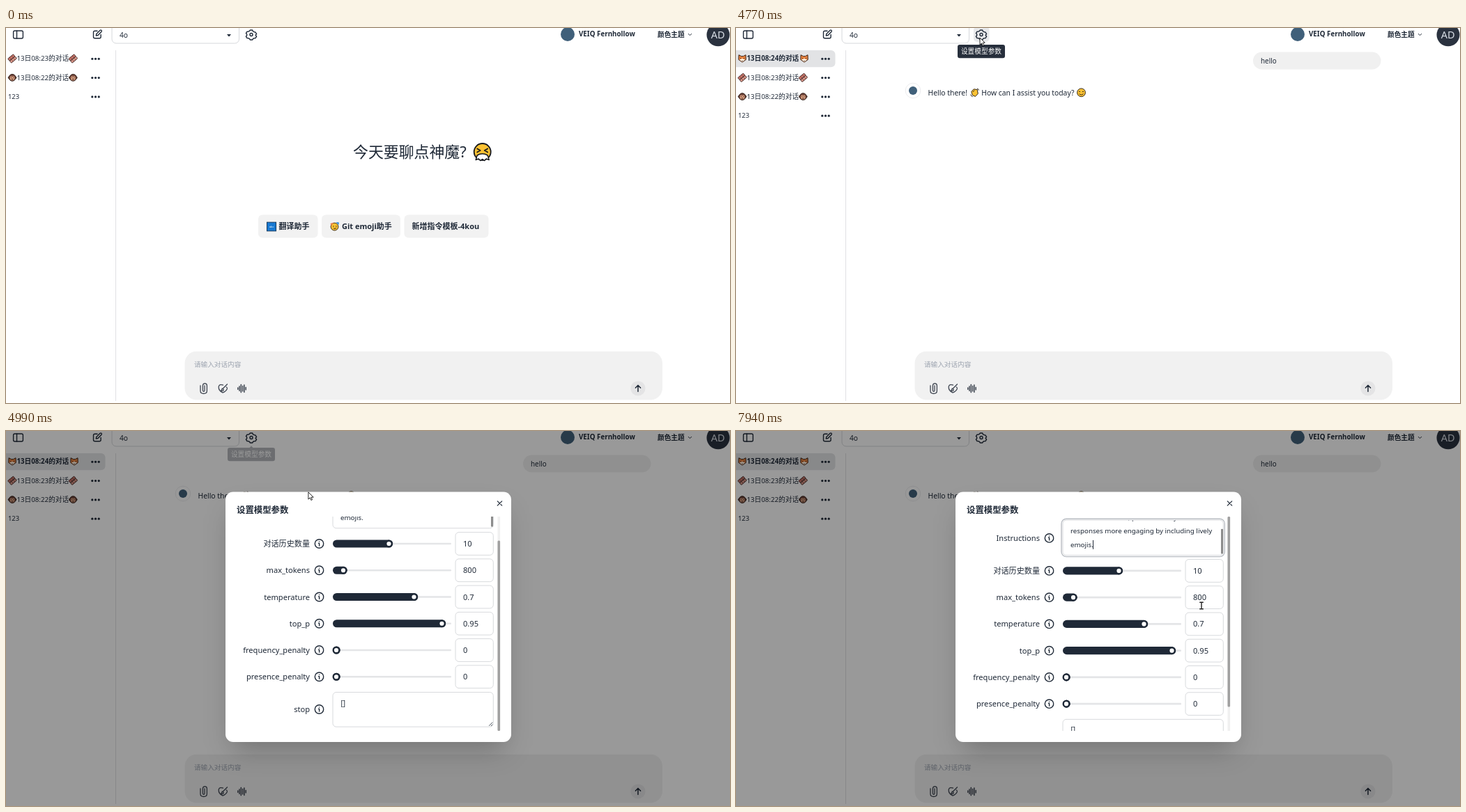
These frames come from a looping animation (1039 by 539 pixels, 7990 ms). An HTML page:

```html
<!DOCTYPE html>
<html lang="zh-CN">
<head>
<meta charset="utf-8">
<title>Chat</title>
<style>
  html, body { margin: 0; width: 100%; height: 100%; overflow: hidden; background: #fff; }
  svg { display: block; width: 1039px; height: 539px; }
  text { font-family: "Noto Sans", "Noto Sans CJK SC", "Noto Sans CJK", sans-serif; fill: #1f2937; white-space: pre; }
  .b { font-weight: 700; }
  .end { text-anchor: end; }
  .mid { text-anchor: middle; }
  .line { fill: none; stroke: #1f2937; stroke-width: 1.4; stroke-linecap: round; stroke-linejoin: round; }
  .field { fill: #fff; stroke: #d8dadd; stroke-width: 1; }
  .soft { fill: #f2f2f2; }
  .dark { fill: #1f2937; }
  .shadow { fill: rgba(0, 0, 0, .25); filter: blur(19px); }
</style>
</head>
<body>
<svg viewBox="0 0 1039 539">
  <defs>
    <clipPath id="bodyClip"><rect x="325" y="123" width="390" height="308"/></clipPath>
    <clipPath id="areaClip"><rect x="469" y="89.5" width="230" height="50"/></clipPath>
    <g id="fox">
      <path d="M-5-5.3L-1.5-3.5H1.5L5-5.3 5.2 1.5 0 5.2-5.2 1.5Z" fill="#e98440" stroke="#3b2418"/>
      <path d="M-4 1.5L0 0 4 1.5 0 4.7Z" fill="#fff3e4"/>
      <path d="M-2.3-1v1M2.3-1v1M-.6 3.2H.6" stroke="#2a1a14" fill="none"/>
    </g>
    <g id="meat" transform="rotate(-40) scale(.86)">
      <rect x="-6" y="-4.6" width="12" height="4.4" rx="1.3" fill="#c9776c" stroke="#38201c"/>
      <rect x="-6" y=".2" width="12" height="4.4" rx="1.3" fill="#dd9c8e" stroke="#38201c"/>
      <path d="M-2-4v3M2-4v3M-2 1v3M2 1v3" stroke="#743d35"/>
    </g>
    <g id="monkey">
      <circle cx="-4.4" r="1.4" fill="#c48a68" stroke="#33211b"/>
      <circle cx="4.4" r="1.4" fill="#c48a68" stroke="#33211b"/>
      <circle r="4.9" fill="#70453a" stroke="#33211b"/>
      <path d="M-3.3-.5Q-2-3 0-1.3 2-3 3.3-.5 4 4 0 4-4 4-3.3-.5Z" fill="#d39a7c"/>
      <path d="M-1.5-.6v1M1.5-.6v1M-1.3 2.4H1.3" stroke="#33211b" stroke-width=".9"/>
    </g>
    <g id="sneeze">
      <circle r="12" fill="#fcc233" stroke="#16181d" stroke-width="1.8"/>
      <path d="M-7.5-4.5L-3-2-7.5.5M7.5-4.5L3-2 7.5.5" fill="none" stroke="#16181d" stroke-width="1.7" stroke-linecap="round" stroke-linejoin="round"/>
      <path d="M-9.5 11.5L-7.5 5Q0 .5 7.5 5L9.5 11.5 5.5 10 3 12.6 0 10.6-3 12.6-5.5 10Z" fill="#fff" stroke="#16181d" stroke-width="1.5" stroke-linejoin="round"/>
    </g>
    <g id="abc">
      <rect x="-6.5" y="-6.3" width="13" height="12.6" fill="#1879d2" stroke="#163a5e"/>
      <text class="mid" y="1.4" font-size="4" style="fill:#fff">abc</text>
    </g>
    <g id="party">
      <circle r="5.4" cy=".6" fill="#fcc233" stroke="#3a2c16"/>
      <path d="M-6-4L-1-5.6-4.6-.6Z" fill="#e8804a"/>
      <path d="M1.8-5.8H6.2V-2Z" fill="#2d8bd8"/>
      <path d="M-2.5 0h1.6M1.5 0h1.6M-1.5 2.8Q.5 4.5 2.5 2.4" fill="none" stroke="#3a2c16"/>
    </g>
    <g id="wave">
      <path d="M-4.5-1.5L-1-5.2 4-4.4 5 1.5 1 5.4-3 3.5Z" fill="#fcc233" stroke="#30261a" stroke-linejoin="round"/>
      <path d="M-2.5-1L0-3.5M-5.6 2.5q.5 2.6 3 3.2M3.6-6q2.2.4 2.6 2.6" fill="none" stroke="#30261a"/>
    </g>
    <g id="smile">
      <circle r="5.9" fill="#fcc233" stroke="#30261a"/>
      <path d="M-3.6-1q1-1.5 2.2 0M1.4-1q1.2-1.5 2.2 0M-3 1.7q3 3.2 6 0" fill="none" stroke="#30261a"/>
    </g>
  </defs>

  <rect width="1039" height="539" fill="#fff"/>

  <!-- header -->
  <g class="line">
    <rect x="10.6" y="4" width="13.8" height="11" rx="2"/><path d="M15.5 4v11"/>
    <path d="M131 4.3h-3.5q-2 0-2 2v6.4q0 2 2 2h6.6q2 0 2-2V9.5M129.3 11l.5-2.6 5.2-5.2q1-.7 1.9.1t.1 1.9l-5.1 5.3z"/>
    <rect x="152" y="-10" width="182.5" height="32" rx="6" style="stroke:#d6d8db;stroke-width:1"/>
  </g>
  <text x="163" y="13.5" font-size="10.2">4o</text>
  <path class="dark" d="M317 9h6l-3 3.4z"/>
  <rect id="hover" x="341" y="-2" width="22.5" height="22" rx="5" fill="#e8e9eb"/>
  <g class="line">
    <path d="M350.3 3h3.4l.7 1.8 2 .9 1.6.3 1.6 2.6-1.2 1.2v1.1l1.2 1.2-1.6 2.4-1.9.1-1.7 1-.7 1.4h-3.4l-.7-1.4-1.7-1-1.9-.1-1.6-2.4 1.2-1.2V8.8l-1.2-1.2 1.6-2.4 1.9-.1 1.7-.9z"/>
    <circle cx="352" cy="9.5" r="2"/>
    <path d="M979.3 8.4l2.2 2.2 2.2-2.2" style="stroke-width:1"/>
  </g>
  <circle cx="806" cy="9" r="10" fill="#40607a"/>
  <text class="b" x="822" y="12" font-size="9.8">VEIQ Fernhollow</text>
  <text class="b" x="935" y="13" font-size="9.7">颜色主题</text>
  <circle cx="1022" cy="9.8" r="16.5" fill="#2a323f"/>
  <text class="mid" x="1021.8" y="15" font-size="14.5" style="fill:#d9dee6">AD</text>

  <!-- sidebar -->
  <path d="M157.5 32V536" stroke="#e0e1e3"/>
  <g id="active">
    <rect x="-6" y="32" width="148.5" height="24.2" rx="6" fill="#e2e3e5"/>
    <g id="activeRow"></g>
  </g>
  <g id="rows"></g>

  <!-- start page -->
  <g id="home">
    <text x="498" y="186" font-size="21.9">今天要聊点神魔?</text>
    <use href="#sneeze" x="683.7" y="178"/>
    <rect class="soft" x="362" y="268.5" width="85.5" height="33" rx="6"/>
    <rect class="soft" x="453" y="268.5" width="113" height="33" rx="6"/>
    <rect class="soft" x="571.5" y="268.5" width="121" height="33" rx="6"/>
    <use href="#abc" x="381" y="285.5"/>
    <use href="#party" x="471.5" y="285"/>
    <g class="b" font-size="11">
      <text x="391.5" y="289.2">翻译助手</text>
      <text x="482" y="289.2">Git emoji助手</text>
      <text x="582.5" y="289.2">新增指令模板-4kou</text>
    </g>
  </g>

  <!-- conversation -->
  <g id="sent">
    <rect x="742" y="34.5" width="183.5" height="25" rx="12.5" fill="#f0f0f0"/>
    <text x="753" y="50.6" font-size="9.9">hello</text>
  </g>
  <g id="reply" font-size="10.35">
    <circle cx="254" cy="90" r="10.8" fill="#fff" stroke="#ececee"/>
    <circle cx="254" cy="90" r="6" fill="#40607a"/>
    <text id="wait" x="275.5" y="96.6" font-size="10.5"></text>
    <text id="say1" x="275.5" y="96.6"></text>
    <use id="emo1" href="#wave" x="342.3" y="93"/>
    <text id="say2" x="352.3" y="96.6"></text>
    <use id="emo2" href="#smile" x="495.5" y="92.8"/>
  </g>

  <!-- composer -->
  <rect x="256.5" y="464.8" width="685.5" height="69.7" rx="17" fill="#f1f1f1"/>
  <text id="hint" x="270" y="486.6" font-size="9.65" style="fill:#9ca3af">请输入对话内容</text>
  <text id="typed" x="270" y="486.6" font-size="9.9"></text>
  <path id="caret" d="M0 476v14" stroke="#1f2937"/>
  <g class="line" style="stroke:#3f4651;stroke-width:1.3">
    <path d="M279 514v7.5q0 4 4.7 4t4.7-4V514q0-3.2-3-3.2t-3 3.2v6.8q0 1.6 1.3 1.6t1.3-1.6V514"/>
    <path d="M317.5 512l-6.5 6.5M310.2 518.3q2 .2 2 2-1 1.7-3.6 1.2.9-1 1.6-3.2M311.5 513.2q-5.6-2-6.3 2.5-.3 5.5 5.8 8.5 4.8-1.8 6.3-5.4.6-2-1.1-2.8"/>
    <path d="M332.8 517v2.5M335 515v6.5M337.3 512.6v11.2M339.6 514.5v7.5M341.9 513v10.5M344.2 516.5v3.5" style="stroke-width:1.5"/>
  </g>
  <circle cx="907" cy="518" r="10.6" fill="#e4e4e5"/>
  <path id="up" class="line" d="M907 522.4v-8.6M903.4 517.3l3.6-3.7 3.6 3.7" style="stroke-width:1.5"/>
  <rect id="halt" class="dark" x="902.2" y="513.3" width="9.8" height="9.8" rx="1"/>

  <g id="tip">
    <path d="M318 27q0-3 3-3h28.5l2.5-2.5 2.5 2.5H383q3 0 3 3v13.3q0 3-3 3H321q-3 0-3-3z" fill="#272f3c"/>
    <text class="mid" x="352" y="37.4" font-size="9.7" style="fill:#fff">设置模型参数</text>
  </g>

  <rect id="shade" width="1039" height="539"/>

  <!-- settings dialog -->
  <g id="modal">
    <rect class="shadow" x="324.5" y="116.5" width="391" height="340.5" rx="11"/>
    <rect x="315" y="87.5" width="410" height="359.5" rx="11" fill="#fff"/>
    <text class="b" x="331" y="118.2" font-size="12.4">设置模型参数</text>
    <path class="line" d="M705.3 100.8l6.4 6.4M711.7 100.8l-6.4 6.4" style="stroke-width:1.2"/>
    <rect x="705.5" y="123" width="3.6" height="308" fill="#f0f0f0"/>
    <rect id="bar" x="705.5" y="157.5" width="3.6" height="273.5" rx="1.5" fill="#a0a0a0"/>
    <g clip-path="url(#bodyClip)">
      <g id="scroll">
        <rect id="ring" x="467" y="87.3" width="234.3" height="54.4" rx="7" fill="none" stroke="#b9bdc3" stroke-width="1.4"/>
        <rect class="field" x="469" y="89.2" width="230.3" height="50.5" rx="5"/>
        <g clip-path="url(#areaClip)" font-size="9.75">
          <text x="480" y="89.4">With conversation, please make your</text>
          <text x="480" y="108.6">responses more engaging by including lively</text>
          <text x="480" y="127.7">emojis.</text>
          <rect x="696" y="102" width="3.2" height="35.5" fill="#8d8d8d"/>
        </g>
        <path id="caret2" d="M512.5 118v13" stroke="#1f2937"/>
        <g id="params"></g>
        <rect class="field" x="469" y="375.5" width="230.3" height="49.7" rx="5"/>
        <text x="480.5" y="394.6" font-size="10">[]</text>
        <path class="line" d="M693.5 423.5l4.5-4.5M696.2 423.8l1.8-1.8" style="stroke-width:.8"/>
      </g>
    </g>
  </g>

  <g id="mouse">
    <path id="arrow" d="M0 0V10.2L2.4 8 4 11.6 5.7 10.8 4.1 7.3H7.3Z" fill="#fff" stroke="#111" stroke-width=".9"/>
    <path id="beam" d="M-2.8-4.8H2.8M0-4.8V4.8M-2.8 4.8H2.8" fill="none" stroke="#222" stroke-width="1.4"/>
    <path id="hand" d="M-1.8 1.6V-5q0-1.2 1-1.2t1 1.2v3.2q1.2-.5 1.6.5 1.2-.5 1.6.5 1.2-.1 1.2 1.1v2.5q0 3.4-3 3.4H.2q-1.5 0-2.4-1.6L-4.3 1.5q-.4-1.5 1-1.2z" fill="#fff" stroke="#111" stroke-width=".9" stroke-linejoin="round"/>
  </g>
</svg>

<script>
const LOOP = 7990, TICK = 68.9, BLINK = 530;
const SEND = 1730, REPLY = 1830, STREAM = 2860, DONE = 3540, OPEN = 4835, FOCUS = 6220;
const el = {};
document.querySelectorAll('[id]').forEach(n => el[n.id] = n);

const show = (id, on) => el[id].setAttribute('visibility', on ? 'visible' : 'hidden');
const set = (id, name, value) => el[id].setAttribute(name, value);

// value of the last key reached
const step = (keys, t) => keys.reduce((v, k) => t >= k[0] ? k[1] : v, 0);

// linear interpolation of column c between timed keys
function mix(keys, t, c = 1) {
  const i = keys.findIndex(k => k[0] > t);
  if (i < 0) return keys[keys.length - 1][c];
  if (i === 0) return keys[0][c];
  const a = keys[i - 1], b = keys[i];
  return a[c] + (b[c] - a[c]) * (t - a[0]) / (b[0] - a[0]);
}

const blink = (t, from) => t >= from && Math.floor((t - from) / BLINK) % 2 === 0;

// sidebar
const dots = y => [123.8, 128.5, 133.2].map(x => `<circle class="dark" cx="${x}" cy="${y}" r="1.6"/>`).join('');
const row = (y, label, emo, bold) =>
  `<text x="${emo ? 15.5 : 3}" y="${y + 3.4}" font-size="${emo ? 9.7 : 9.4}" class="${bold ? 'b' : ''}">${label}</text>` +
  (emo ? `<use href="#${emo}" x="9" y="${y}"/><use href="#${emo}" x="${bold ? 98 : 96.3}" y="${y}"/>` : '') + dots(y + .3);
el.activeRow.innerHTML = row(44, '13日08:24的对话', 'fox', true);
el.rows.innerHTML = row(44, '13日08:23的对话', 'meat') + row(71.3, '13日08:22的对话', 'monkey') + row(98.6, '123');

// dialog rows
const info = y => `<g class="line"><circle cx="449.5" cy="${y}" r="6.2"/><path d="M448.5 ${y - .6}h1.1v3.6M449.5 ${y - 3}v.1"/></g>`;
const label = (y, name) => `<text class="end" x="436" y="${y + 4}" font-size="11.1">${name}</text>` + info(y);
const slider = (y, name, x, value) => label(y, name) +
  `<rect x="469" y="${y - 1.3}" width="170" height="2.6" rx="1.3" fill="#e4e5e7"/>
   <rect class="dark" x="469" y="${y - 5.6}" width="${x - 463.3}" height="11.2" rx="5.6"/>
   <circle cx="${x}" cy="${y}" r="4.3" fill="#fff" stroke="#1f2937" stroke-width="2.4"/>
   <rect class="field" x="645" y="${y - 16.4}" width="54.3" height="32.8" rx="5"/>
   <text x="656" y="${y + 4}" font-size="11.1">${value}</text>`;
el.params.innerHTML = label(115, 'Instructions') + [
  ['对话历史数量', 549.5, 10], ['max_tokens', 484, 800], ['temperature', 585.5, 0.7],
  ['top_p', 625.5, 0.95], ['frequency_penalty', 474, 0], ['presence_penalty', 474, 0]
].map((p, i) => slider(162 + i * 38.25, ...p)).join('') + label(400, 'stop');

const path = [
  [130, 736, 168], [200, 705, 300], [270, 660, 410], [400, 580, 503], [540, 555, 475],
  [3540, 555, 475], [3750, 520, 380], [3960, 440, 190], [4150, 385, 70], [4290, 366, 30],
  [4360, 354, 17], [4420, 350, 14], [4764, 350, 14], [4833, 357, 22], [4902, 390, 50],
  [4971, 434, 88], [5040, 470, 128], [5180, 520, 185], [5320, 534, 207], [5735, 534, 207],
  [5800, 552, 170], [5935, 564, 138], [6010, 564, 149], [6200, 564, 149], [6280, 530, 164],
  [6420, 518, 164], [6680, 518, 164], [6760, 500, 170], [7000, 540, 190], [7250, 590, 225],
  [7440, 614, 243], [7600, 670, 252], [7720, 698, 262], [7860, 676, 253], [7930, 668, 251]
];
const shapes = [
  [0, 'arrow'], [330, 'beam'], [3600, 'arrow'], [5170, 'hand'], [5795, 'beam'],
  [6960, 'hand'], [7590, 'beam']
];
const scrollKeys = [[5522, 0], [5729, 27.3], [5798, 34], [5866, 38.9]];
const modalKeys = [[OPEN, .56], [4905, .9], [4975, 1]];
const shadeKeys = [[OPEN, .16], [4905, .32], [4975, .4]];
const tipKeys = [[4500, 1], [4905, .75], [4975, .35], [5045, 0]];

const first = ['Hello', 'there!'], second = ['How', 'can', 'I', 'assist', 'you', 'today?'];

function draw(t) {
  const sent = t >= SEND;
  show('home', !sent);
  show('sent', sent);
  show('active', sent);
  set('rows', 'transform', `translate(0 ${sent ? 27.3 : 0})`);

  // composer
  const typed = sent ? '' : 'hello'.slice(0, Math.max(0, Math.floor((t - 1270) / 70)));
  el.typed.textContent = typed;
  show('hint', !typed);
  const width = typed ? el.typed.getComputedTextLength() : 0;
  set('caret', 'transform', `translate(${270.5 + width})`);
  show('caret', t < OPEN && (typed || blink(t, sent ? SEND : 680)));
  const busy = sent && t < DONE;
  show('halt', busy);
  show('up', !busy);

  // reply
  const count = t < STREAM ? 0 : Math.floor((t - STREAM) / 65) + 1;
  set('reply', 'opacity', t >= REPLY ? 1 : 0);
  const tail = Math.max(0, Math.floor((t - 1990) / 70));
  el.wait.textContent = count ? '' : '正在请求中' + '... ...'.slice(0, tail);
  el.say1.textContent = first.slice(0, count).join(' ');
  el.say2.textContent = second.slice(0, Math.max(0, count - 3)).join(' ');
  show('emo1', count > 2);
  show('emo2', count > 9);

  // dialog
  show('hover', t >= 4360 && t < OPEN);
  set('tip', 'opacity', step(tipKeys, t));
  set('shade', 'opacity', step(shadeKeys, t));
  const p = step(modalKeys, t);
  set('modal', 'opacity', p);
  set('modal', 'transform', `translate(520 267.4) scale(${.9 + .1 * p}) translate(-520 -267.4)`);

  const tick = Math.max(0, Math.floor((t - 10) / TICK) * TICK + 10);
  const s = mix(scrollKeys, tick);
  set('scroll', 'transform', `translate(0 ${s})`);
  set('bar', 'transform', `translate(0 ${-s * .887})`);
  show('ring', t >= FOCUS);
  show('caret2', t >= FOCUS && (t < 6490 || blink(t, 6490)));

  set('mouse', 'transform', `translate(${mix(path, tick, 1)} ${mix(path, tick, 2)})`);
  const shape = step(shapes, tick);
  for (const id of ['arrow', 'beam', 'hand']) show(id, t >= 130 && id === shape);
}

const start = performance.now();
function frame() {
  draw((performance.now() - start) % LOOP);
  requestAnimationFrame(frame);
}
frame();
</script>
</body>
</html>
```
